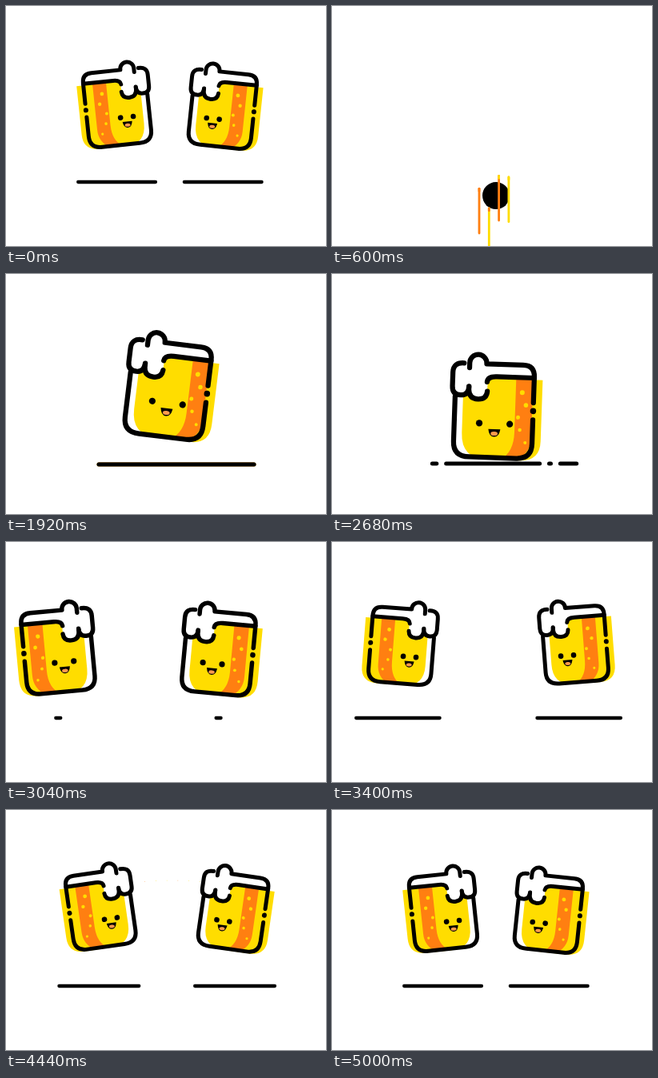
An HTML page for the animation above (5.04 s loop, 400 by 300 pixels).

```html
<!DOCTYPE html>
<html lang="en">
<head>
<meta charset="utf-8">
<title>Cheers</title>
<style>
html, body { margin: 0; width: 100%; height: 100%; overflow: hidden; background: #fff; }
svg { display: block; width: 100%; height: 100%; }
</style>
</head>
<body>
<svg id="stage" viewBox="0 0 400 300" fill="none" stroke-linecap="round" stroke-linejoin="round"></svg>
<script>
const LOOP = 5040;
const INK = { K: '#000', Y: '#ffdd00', O: '#ff7f11', B: '#4db8ff' };
const { K, Y, O, B } = INK;
const stage = document.getElementById('stage');

const clamp = v => Math.max(0, Math.min(1, v));
const mix = (a, b, u) => a + (b - a) * u;
const smooth = u => u * u * (3 - 2 * u);
const quadOut = u => u * (2 - u);
const arc = u => 4 * u * (1 - u);
const bow = u => Math.sin(Math.PI * u);
const span = (t, a, b) => clamp((t - a) / (b - a));
const n = v => +v.toFixed(2);

const stroke = (d, color, w, extra = '') => `<path d="${d}" stroke="${color}" stroke-width="${w}" ${extra}/>`;
const disc = (x, y, r, color) => `<circle cx="${n(x)}" cy="${n(y)}" r="${n(r)}" fill="${color}"/>`;
const bar = (x1, x2, y, w, color = K) => x2 - x1 > .3 ? stroke(`M${n(x1)} ${n(y)}H${n(x2)}`, color, w) : '';
const group = (x, y, sx, sy, body, rot = 0) =>
  `<g transform="translate(${n(x)} ${n(y)}) rotate(${n(rot)}) scale(${n(sx)} ${n(sy)})">${body}</g>`;

// Part of a path between a and b percent of its length
const part = (d, a, b, color, w) => b - a < .2 ? '' :
  stroke(d, color, w, `pathLength="100" stroke-dasharray="0 ${n(a)} ${n(b - a)} 300"`);

/* ---------- mug ---------- */

// Outline strokes, each with the equal colour bands it is drawn in
const OUTLINE = [
  ['M-39 -14V31Q-39 46 -23 46H24Q39.5 46 39.5 31V7', 'Y'],
  ['M39.5 -35H2Q-7 -35 -7.5 -29.5', 'B'],
  ['M-25.5 -43V-48A8.5 8.5 0 0 1 -8.5 -48V-47.5H28Q39.5 -47.5 39.5 -36V-10', 'KKYOOOBBYO'],
  ['M-31 -47.5Q-42 -48 -42 -38V-24Q-42 -15.5 -33.5 -15.5Q-25.5 -15.5 -25.5 -24.5', 'OB'],
  ['M-25.5 -24V-21Q-25 -12 -16 -12Q-7.5 -12 -7 -20', 'BYYYK']
];
const FOAM = 'M-25.5 -43V-48A8.5 8.5 0 0 1 -8.5 -48L-7 -30V-20Q-7 -12 -16 -12Q-25 -12 -25.5 -21Q-26 -15.5 -33 -15.5Q-42 -15.5 -42 -24V-38Q-42 -48 -31 -47.5Z';

function beer(level, shift) {
  if (level > 47) return '';
  const full = clamp((38 - level) / 25);
  const left = n(mix(-7, -31, full)), r = 26 * full, q = n(mix(1, 20, full)), top = n(level);
  let s = `<path d="M${left} ${top}H48V${48 - q}Q48 48 ${48 - q} 48H${n(left + r)}Q${left} 48 ${left} ${n(48 - r)}Z" fill="${Y}"/>`;
  if (level > 5) return s;
  s += `<g transform="translate(${n(shift)})"><path d="M11 ${top}H28V24Q28 40 14 47.5H-2Q11 40 11 20Z" fill="${O}"/>`;
  for (let i = 0; i < 5; i++) {
    const y = -20 + 12.5 * i;
    if (y > level + 3) s += disc(17.5 + 4.5 * Math.sin(i * 2), y, 2.4 - .2 * i, Y);
  }
  return s + '</g>';
}

function face(cx, gap, awake) {
  const l = n(cx - gap / 2), r = n(cx + gap / 2);
  cx = n(cx);
  if (!awake) {
    return stroke(`M${l - 2.5} 14h5M${r - 2.5} 14h5`, K, .9) + stroke(`M${cx - 4.5} 26.5q4.5 -.8 9 0`, K, 3);
  }
  return disc(l, 12, 3.3, K) + disc(r, 12, 3.3, K) +
    `<path d="M${cx - 6} 17.5h12q-1 7.7 -6 7.7t-6 -7.7Z" fill="${K}"/>` +
    `<ellipse cx="${cx}" cy="22" rx="3.5" ry="2" fill="#ff9a4d"/>`;
}

// Colour bands grow from the middle, then black closes in from both ends
function outline(grow, ink) {
  const lo = 50 - 50 * grow, hi = 50 + 50 * grow;
  let s = '';
  for (const [d, bands] of OUTLINE) {
    if (ink >= 50) { s += stroke(d, K, 5); continue; }
    const step = 100 / bands.length;
    [...bands].forEach((c, i) => {
      s += part(d, Math.max(i * step, lo), Math.min((i + 1) * step, hi), INK[c], 5);
    });
    s += part(d, lo, ink, K, 5) + part(d, 100 - ink, hi, K, 5);
  }
  return s + (grow > .6 ? stroke('M39.5 -2v.2', ink < 50 ? O : K, 6) : '');
}

function look(t) {
  const turn = smooth(span(t, 2840, 3200));
  return {
    level: t < 1440 ? mix(48, 38, span(t, 1360, 1440)) : mix(38, -33, smooth(span(t, 1440, 1700))),
    shift: mix(10.5, 0, turn),
    grow: smooth(span(t, 1160, 1460)),
    ink: 9 + 41 * span(t, 1440, 1660),
    cx: mix(1.3, -10.5, turn),
    gap: mix(30.5, 16, turn),
    awake: t > 1680
  };
}

function mug(x, y, rot, scale, side, t) {
  const v = look(t);
  return group(x, y, scale * side, scale,
    beer(v.level, v.shift) + `<path d="${FOAM}" fill="#fff"/>` +
    outline(v.grow, v.ink) + face(v.cx, v.gap, v.awake), rot);
}

/* ---------- one mug: leap, then two hops ---------- */

function solo(t) {
  const u = span(t, 1160, 1670);
  if (u < 1) {
    const scale = 1.25 * quadOut(span(t, 1120, 1400));
    return mug(204 - 11 * bow(u), mix(222, 172, u) - 76 * arc(u), 25 * bow(u) + 2 * u, scale, 1, t);
  }
  const hop = Math.min(2, (t - 1670) / 505) % 1;
  return mug(202, 172 - 26 * arc(hop), 2 + 5 * bow(hop), 1.25, 1, t);
}

function soloFloor(t) {
  if (t < 1080 || t >= 2790) return '';
  const wide = quadOut(span(t, 1100, 1280)), worn = span(t, 2440, 2680);
  const c = mix(206, 213, wide) + 2.5 * worn, half = mix(40, 97, wide) - 6 * worn, y = 238 - worn;
  if (!worn) {
    const tip = half * (1 - span(t, 1440, 1680));
    const layer = (cut, color) => bar(c - half + tip * cut, c + half - tip * cut * 1.3, y, 5, color);
    return layer(0, Y) + layer(.06, B) + layer(.18, O) + layer(.34, K);
  }
  const close = 1 - span(t, 2680, 2790);
  let from = c - half, s = '';
  for (const cut of [136, 266, 280, c + half + 6 * worn]) {
    s += bar(mix(c, from, close), mix(c, cut - 6 * worn, close), y, 5);
    from = cut + 6 * worn;
  }
  return s;
}

/* ---------- two mugs: enter, rush together, bounce apart ---------- */

// Distance d between the mugs sets both places
function pairPose(t) {
  if (t < 3400) {
    const u = quadOut(span(t, 2840, 3360));
    return { d: mix(-22, 108, u), y: mix(172, 130, u) - 8 * bow(u), tilt: mix(2, -4.5, u) + 8 * bow(u), scale: mix(1.25, 1, u), enter: u };
  }
  if (t < 4040) {
    const u = span(t, 3400, 4000);
    return { d: mix(108, 47.75, u ** 3) + 8 * bow(u), y: 130 - 5 * u, tilt: -4.5 * (1 - u) + 5 * bow(u), scale: 1, enter: 1 };
  }
  const u = span(t, 4040, 4980);
  return { d: 47.75 + 17.75 * (smooth(u) + 1.6 * bow(u)), y: 125 + 4 * smooth(u), tilt: 6 * (smooth(u) + bow(u)), scale: 1, enter: 1 };
}

function pair(t, fall = 0) {
  const { d, y, tilt, scale, enter } = pairPose(t);
  const floor = fall ? 1 - clamp(fall / 150) : smooth(span(t, 2980, 3380));
  let s = '', front = '';
  for (const side of [-1, 1]) {
    const x = side > 0 ? 219.3 + .78 * d : mix(-70, 219.3 - 1.22 * d, enter);
    const mid = x + side * (d - 57) * .1, half = (42.5 + .09 * d) * floor;
    s += bar(mid - half, mid + half, 220, 4.3);
    s += mug(x - side * fall * .1, y + side * tilt / 6 + fall, side * tilt, scale, side, t);
    front += trails(t, x, side);
  }
  return s + front;
}

// Tail and head points, percent where black begins
const TRAILS = [[79, -21, 46, -14, 100], [115, -1, 20, 4, 54], [99, 39, 30, 47, 79]];

function trails(t, x, side) {
  if (t < 3760 || t > 4220) return '';
  const from = 100 * (t < 4000 ? 1 - span(t, 3760, 4000) : span(t, 4000, 4220));
  let s = '';
  for (const [x1, y1, x2, y2, dark] of TRAILS) {
    const d = `M${x1} ${y1}Q${(x1 + x2) / 2} ${y2 + 2} ${x2} ${y2}`;
    s += part(d, from, 100, Y, 3) + part(d, Math.max(from, dark), 100, K, 3) + part(d, from, Math.min(100, from + 3), B, 3);
  }
  return group(t < 4000 ? x : 208.75 + side * 47.75, 125, side, 1, s);
}

function splash(t) {
  const u = span(t, 4020, 4480);
  if (u <= 0 || u >= 1) return '';
  let s = '';
  for (let i = 0; i < 6; i++) {
    const dir = i - 2.5;
    s += disc(208 + dir * 15 * u, 82 - (30 - 2 * Math.abs(dir)) * arc(u) + 18 * u * u, 2.4 * (1 - u * u), i % 3 ? Y : O);
  }
  return s;
}

/* ---------- ball and sparks ---------- */

function ball(t) {
  if (t < 500 || t > 1110) return '';
  const rise = 149 + 89 * ((t - 800) / 200) ** 2;
  const y = t < 800 ? rise : Math.min(238, rise);
  const flat = smooth(span(t, 990, 1110));
  let s = `<ellipse cx="205" cy="${n(y)}" rx="${n(mix(17, 60, flat))}" ry="${n(mix(17, 2.5, flat))}" fill="${K}"/>`;
  const k = 1 - span(t, 600, 780);
  for (let i = 0; k && i < 4; i++) {
    const x = n(184 + 12.3 * i), top = n(229 + 26 * Math.sin(i * 1.9) + (rise - 238) * .8);
    const hue = i % 2, line = [O, Y][hue], tip = [O, Y][i % 3 ? 1 - hue : hue];
    s += stroke(`M${x} ${top}v${n(56 * k)}`, line, 2.8) + stroke(`M${x} ${top}v${n(3 * k)}`, tip, 2.8);
  }
  return s;
}

const SPARK = {
  dot: color => disc(0, 0, 2, color),
  ring: color => `<circle r="5" stroke="${color}" stroke-width="2.8"/>`,
  plus: color => stroke('M-3 0H3M0 -3V3', color, 1.8)
};

function sparks(t) {
  if (t < 1260 || t > 1660) return '';
  const fade = span(t, 1440, 1660), g = quadOut(span(t, 1260, 1440)) + .15 * fade;
  return 'plus ring dot dot ring plus dot plus'.split(' ').map((kind, i) =>
    group(mix(206, 170 + 10.3 * i, g), mix(215, 221 - 11 * (i % 3), g), 1 - fade ** 2, 1 - fade ** 2,
      SPARK[kind](INK['YBOYOOBB'[i]]))).join('');
}

/* ---------- scene ---------- */

function scene(t) {
  if (t < 450) return pair(LOOP, 270 * span(t, 40, 450) ** 2);
  if (t < 2840) return soloFloor(t) + ball(t) + sparks(t) + (t >= 1160 ? solo(t) : '');
  return pair(t) + splash(t);
}

const start = performance.now();
function draw() {
  stage.innerHTML = scene((performance.now() - start) % LOOP);
  requestAnimationFrame(draw);
}
draw();
</script>
</body>
</html>
```
